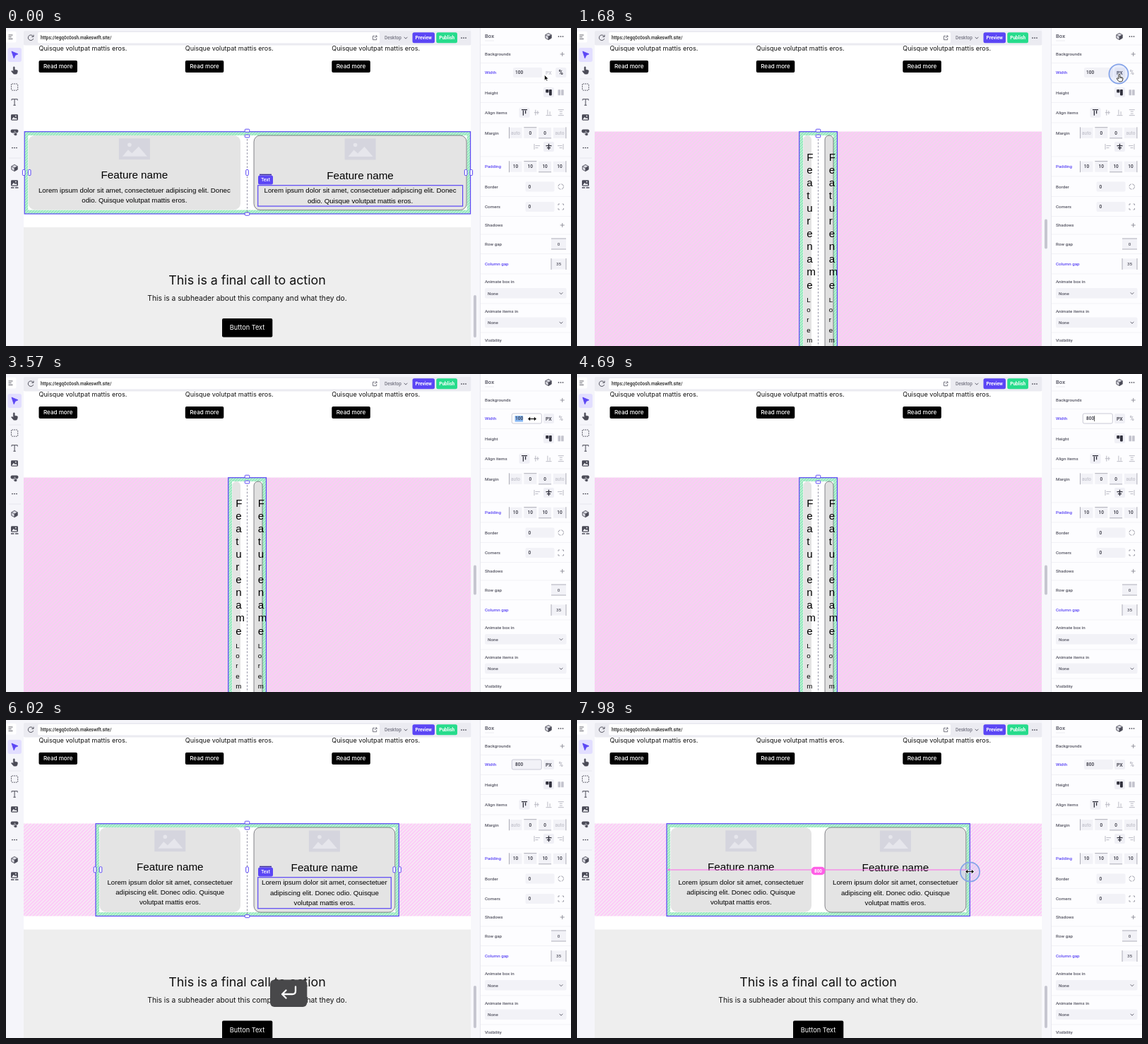
An HTML page that plays this animation: 800x450 px, repeating every 8 s.

```html
<!DOCTYPE html>
<html lang="en">
<head>
<meta charset="utf-8">
<title>Box width editor</title>
<style>
html, body { margin: 0; width: 100%; height: 100%; overflow: hidden; background: #f5f5fa; }
svg { display: block; width: 100vw; height: 100vh; }
text { font-family: Roboto, sans-serif; font-size: 6.25px; font-weight: 500; fill: #555562; white-space: pre; }
.page { font-family: Inter, sans-serif; font-weight: 400; fill: #111; }
.copy { font-family: "Liberation Sans", Arial, sans-serif; font-weight: 400; fill: #000; }
</style>
</head>
<body>
<svg id="stage" viewBox="0 0 800 450" xmlns="http://www.w3.org/2000/svg"></svg>
<script>
const LOOP = 8000;
const VIOLET = '#5b46f5', INK = '#30303c', ICON = '#4b4b57', PALE = '#c3c3cd', FIELD = '#f2f2f7', EDGE = '#9a9aa6';
const stage = document.getElementById('stage');

// Markup helpers
const rect = (x, y, w, h, fill, r = 0, more = '') =>
  `<rect x="${x}" y="${y}" width="${w}" height="${h}" rx="${r}" fill="${fill}" ${more}/>`;
const path = (d, stroke = INK, w = 1, fill = 'none', more = '') =>
  `<path d="${d}" stroke="${stroke}" stroke-width="${w}" fill="${fill}" ${more}/>`;
const text = (x, y, s, more = '') => `<text x="${x}" y="${y}" ${more}>${s}</text>`;
const mid = 'text-anchor="middle" ';
const style = (px, fill, weight) =>
  `style="font-size:${px}px${fill ? ';fill:' + fill : ''}${weight ? ';font-weight:' + weight : ''}"`;
const at = (x, y, s) => `<g transform="translate(${x} ${y})">${s}</g>`;
const group = (id, s) => `<g id="${id}">${s}</g>`;
const dots = (x, y, c = INK) => [-3, 0, 3].map(d => `<circle cx="${x + d}" cy="${y}" r=".85" fill="${c}"/>`).join('');
const plus = (x, y) => path(`M${x - 3} ${y}h6M${x} ${y - 3}v6`, '#7b7b88', .8);
const chevron = (x, y) => path(`M${x - 2.3} ${y - 1.2}l2.3 2.4 2.3-2.4`, '#555562', .9);
const stripes = (id, base, line, gap, w) =>
  `<pattern id="${id}" width="${gap}" height="${gap}" patternUnits="userSpaceOnUse" patternTransform="rotate(45)">
   ${rect(0, 0, gap, gap, base)}${rect(0, 0, w, gap, line)}</pattern>`;

const defs = `<defs>
  ${stripes('green', '#c9f3dc', '#86e6b4', 2.8, 1.4)}
  ${stripes('pink', '#fdc9f8', '#ecdbe9', 3.5, 1.5)}
  ${stripes('pinkSoft', '#fdc9f8', '#f6e9f4', 3.5, 1.7)}
  <clipPath id="view"><rect x="25" y="24" width="633.5" height="426"/></clipPath>
</defs>`;

function cube(x, y) {
  return at(x, y, path('M0-4.6L4.2-2.3V2.3L0 4.6-4.2 2.3V-2.3Z', ICON, .9, '#dcdce4') +
    path('M0 0L4.2-2.3V2.3L0 4.6Z', 'none', 0, ICON) + path('M-4.2-2.3L0 0 4.2-2.3M0 0V4.6', ICON, .8));
}

function picture(x, y) {
  return at(x, y, rect(-5, -4.2, 10, 8.4, ICON, 1.4) +
    path('M-4 3L-1.2-.4 .8 1.6 2.2.4 4 3Z', 'none', 0, '#f5f5fa') + '<circle cx="1.8" cy="-1.8" r=".9" fill="#f5f5fa"/>');
}

const ARROW = 'M-4-5L5-1.2 1.2.6-.8 4.8Z';
const HAND = 'M-1.7 1V-4.2Q-1.7-5.3-.7-5.3T.3-4.2V-1L3.6-.4Q4.6-.1 4.5 1L4 3.6Q3.7 5.3 2 5.3H-.3Q-1.3 5.3-2 4.3L-4.3 1.4Q-4.6.6-3.8.4T-1.7 1.6Z';

function toolbar() {
  return rect(0, 0, 25, 450, '#f5f5fa') + rect(-2, 5, 16.5, 15.5, '#fff', 2) +
    path('M3.5 10h6M3.5 12.7h4.2M3.5 15.4h6', INK, .8) +
    rect(2.5, 28, 19.5, 20, '#e2deff', 3) +
    at(12, 38, path(ARROW, VIOLET, .8, VIOLET)) +
    at(12, 60, path(HAND, ICON, .4, ICON)) +
    path('M4 72h17M4 184h17', '#e4e4ec', .8) +
    rect(7.5, 79, 9.2, 9.2, 'none', 1, `stroke="${ICON}" stroke-width="1" stroke-dasharray="1.7 1.2"`) +
    path('M8 102.5v-1.8h8.2v1.8M12.1 101v8.4M10.4 109.2h3.4', ICON, 1) +
    picture(12, 126.5) +
    rect(6.5, 143.4, 11, 5, ICON, 2.4) + at(13, 149, path(HAND, '#f5f5fa', .8, ICON, 'transform="scale(.6)"')) +
    dots(12, 169.5) + cube(12, 198) + picture(12, 219.5) + path('M7 226h4.5M13 226h4.5', ICON, 1.3);
}

function topBar() {
  return rect(25, 4, 633.5, 20.5, '#ebebf1', 2) + rect(45, 6, 484, 15.5, '#fff', 2) +
    path('M38.4 11.8a3.8 3.8 0 1 0 .3 3.2M39 9.7v2.7h-2.7', ICON, .95) +
    text(49, 16.1, 'https://iegq0c0osh.makeswift.site/', style(6.4, '#222')) +
    path('M522 11.3h-2.5v5.4h5.2v-2.5M522 14l2.8-2.9M523 11h2v2', '#555562', .8) +
    text(536, 16.1, 'Desktop', style(6.5, '#777784')) + chevron(566, 14) +
    rect(575.5, 6.3, 31.5, 15, VIOLET, 2.5) + rect(609.3, 6.3, 29.7, 15, '#27dc8c', 2.5) +
    text(591.2, 16, 'Preview', mid + style(6.5, '#fff', 700)) +
    text(624.2, 16, 'Publish', mid + style(6.5, '#fff', 700)) + dots(648, 14);
}

function fourSides(y, values) {
  return values.map((v, i) => {
    const x = 721.5 + i * 20.8;
    const edge = [`M${x - 9} ${y - 8}v16`, `M${x - 9} ${y - 7.6}h18`, `M${x - 9} ${y + 7.6}h18`, `M${x + 9} ${y - 8}v16`][i];
    return rect(x - 9, y - 7.5, 18, 15, FIELD) + path(edge, EDGE, .8) +
      text(x, y + 2.2, v, mid + style(6.5, v === 'auto' ? PALE : INK));
  }).join('');
}

function alignIcon(x, y, kind, on) {
  const c = on ? INK : '#b4b4be';
  const bars = [
    'M-4-4h8M-1.6-3v7M1.6-3v4.5', 'M-3.5 0h7M-1.5-4v8M1.5-2.6v5.2',
    'M-4 4h8M-1.6 3v-7M1.6 3v-4.5', 'M-4-4h8M-4 4h8M-2-1.5h4M-2 1.5h4',
    'M-4-4v8M-2.5-1.4h6.5M-2.5 1.6h4', 'M0-4.2v8.4M-4-1.4h8M-2.6 1.6h5.2', 'M4-4v8M2.5-1.4h-6.5M2.5 1.6h-4'][kind];
  return (on ? rect(x - 7.5, y - 7, 15, 14, '#f0f0f6', 2) : '') + at(x, y, path(bars, c, on ? 1.3 : .9));
}

function panel() {
  const labels = [['Backgrounds', 37], ['Width', 63, 1], ['Height', 91.5], ['Align items', 120], ['Margin', 148.5],
    ['Padding', 196, 1], ['Border', 224.5], ['Corners', 253], ['Shadows', 279.2], ['Row gap', 305.5],
    ['Column gap', 334, 1], ['Animate box in', 359], ['Animate items in', 400.5], ['Visibility', 442]];
  const lines = [24, 49.5, 77.5, 105.5, 134, 182, 210, 238.5, 266.5, 292, 319.5, 348, 390, 431];
  const select = y => rect(678, y - 7.5, 115.5, 14.5, FIELD, 2) + text(682, y + 2.1, 'None') + chevron(786, y);
  const small = y => rect(735.5, y - 7, 41, 14, FIELD, 2) + text(739.5, y + 2.2, '0', style(6.5, INK));
  return rect(658.5, 0, 13, 450, '#f7f7fb') + rect(671.5, 0, 129, 450, '#fdfdff') + path('M671.5 0V450', '#e1e1e9', .8) +
    lines.map(y => path(`M672 ${y}h128`, '#ececf2', .7)).join('') +
    text(678, 14.4, 'Box', style(7.7)) + path('M678 18h13', '#d4d4de', .5) + cube(768, 12) + dots(785.5, 12) +
    labels.map(([s, y, on]) => text(678, y + 2.1, s, on ? `style="fill:${VIOLET}"` : '')).join('') +
    plus(787.7, 37) + plus(787.7, 279) +
    rect(761, 84, 15, 14, '#f0f0f6', 2) + rect(764.2, 87, 4.2, 4.6, INK, .8) + rect(769, 87, 3.8, 8.4, INK, .8) +
    rect(781.5, 87.3, 3.6, 8, PALE, .6) + rect(786.1, 87.3, 3.6, 8, PALE, .6) +
    [734, 751.3, 768.5, 785.8].map((x, i) => alignIcon(x, 119.7, i, !i)).join('') +
    fourSides(148.3, ['auto', 0, 0, 'auto']) +
    [752, 768.5, 785].map((x, i) => alignIcon(x, 168, i + 4, i === 1)).join('') +
    fourSides(196.2, [10, 10, 10, 10]) + small(224.5) + small(253) +
    '<circle cx="785.7" cy="224.5" r="3.8" fill="none" stroke="#7b7b88" stroke-width=".7" stroke-dasharray="4.6 1.4"/>' +
    path('M782 251v-2h2M787.5 249h2v2M789.5 255v2h-2M784 257h-2v-2', '#8b8b98', .8) +
    rect(772, 298, 21, 15, FIELD) + path('M772 298h21M772 313h21', EDGE, .8) + text(782.5, 307.7, '0', mid) +
    rect(772, 326.5, 21, 15, FIELD) + path('M772 326v16M793 326v16', EDGE, .8) + text(782.5, 336.2, '35', mid) +
    select(375.5) + select(417);
}

function teasers() {
  return [46.5, 253.8, 461.3].map(x => text(x, 31.7, 'Quisque volutpat mattis eros.', 'class="page" ' + style(9.05)) +
    rect(x, 46, 54.5, 17, '#000', 2) +
    text(x + 27.2, 57.4, 'Read more', mid + 'class="page" ' + style(8.1, '#fff', 500))).join('');
}

function footer() {
  return rect(25, 282, 633.5, 190, '#eee') +
    text(341.5, 362.6, 'This is a final call to action', mid + 'class="page" ' + style(17.85)) +
    text(341.5, 385.6, 'This is a subheader about this company and what they do.', mid + 'class="page" ' + style(10.25)) +
    rect(306, 411, 71.3, 26.5, '#000', 2) +
    text(341.6, 427.4, 'Button Text', mid + 'class="page" ' + style(9.2, '#fff'));
}

const handle = (x, y, w, h) => rect(x - w / 2, y - h / 2, w, h, '#fff', 1, `stroke="${VIOLET}" stroke-width="1"`);
const topHandles = handle(341.5, 145.2, 6.5, 4) + handle(341.5, 153, 6.5, 3.8);
const outline = (x0, x1, y1) => rect(x0, 146.7, x1 - x0, y1 - 146.7, 'none', 0, `stroke="${VIOLET}" stroke-width="1.2"`);
const divider = y1 => path(`M341.5 157V${y1}`, '#77778f', .8, 'none', 'stroke-dasharray="2.6 2.2"');
const cardEdge = 'stroke="#55555c" stroke-width=".7"';

function card(x0, x1, y1, lines, dy, more = '') {
  const cx = (x0 + x1) / 2;
  return rect(x0, 152, x1 - x0, y1 - 152, '#e4e4e4', 9, more) +
    at(cx, 171.2 + dy * .5, rect(-22, -15, 44, 30, '#d5d5de') +
      path('M-17 10.5L-9 1-3.5 6 6-3.5 18 10.5Z', 'none', 0, '#e6e6ec') + '<circle cx="-7" cy="-6" r="2.8" fill="#e6e6ec"/>') +
    text(cx, 213 + dy, 'Feature name', mid + 'class="copy" ' + style(15.2)) +
    lines.map((s, i) => text(cx, 232.6 + dy + i * 14.4, s, mid + 'class="copy" ' + style(9.7))).join('');
}

// Two cards side by side; marks are the parts hidden while resizing
function wideBox(id, x0, x1, y1, lines) {
  const cy = (146.7 + y1) / 2 - .3, textEnd = x1 - 11, textBottom = 222.5 + lines.length * 14.6 + .4;
  return group(id, rect(x0, 146.7, x1 - x0, y1 - 146.7, 'url(#green)') +
    rect(x0 + 5, 152, x1 - x0 - 10, y1 - 157.4, '#fff') +
    card(x0 + 5.5, 332, y1 - 5.8, lines, 0) + card(351, x1 - 5.5, y1 - 5.4, lines, .6, cardEdge) +
    outline(x0, x1, y1) +
    `<g class="marks">${divider(y1 - 2)}${topHandles}${handle(341.5, y1 + .2, 6.5, 4)}${handle(341.5, cy, 3.6, 8)}` +
    [x0 - 1, x0 + 7, x1 - 6.5, x1 + 1.2].map(x => handle(x, cy, 3.6, 8)).join('') +
    rect(356.7, 222.7, textEnd - 356.7, textBottom - 222.7, 'none', 0, `stroke="${VIOLET}" stroke-width="1.2"`) +
    path('M359 207.5h17', '#3a2b9c', 1.6) + rect(357, 208.5, 21, 13, VIOLET, 2.5) +
    text(367.5, 217.4, 'Text', mid + style(6.5, '#fff')) + '</g>');
}

function thinBox() {
  const column = x => [...'Featurename'].map((c, i) => text(x, 187.5 + i * 18.1, c, 'class="copy" ' + style(15.2))).join('') +
    [...'Lorem'].map((c, i) => text(x, 387.5 + i * 14.45, c, 'class="copy" ' + style(9.7))).join('');
  return group('thin', rect(25, 146.5, 633.5, 310, 'url(#pink)') + rect(314.7, 146.7, 53.8, 320, 'url(#green)') +
    rect(320, 152, 43, 320, '#fff') + rect(320.3, 152, 11.7, 320, '#e4e4e4', 5.8) +
    rect(351, 152, 12, 320, '#e0e0e0', 6, cardEdge) + column(325.3) + column(356.8) +
    outline(314.7, 368.5, 470) + divider(450) + topHandles);
}

function pointers() {
  return group('ring', '<circle r="13.6" fill="#7d9cea" fill-opacity=".14" stroke="#84a3e8" stroke-width="1.7"/>') +
    group('arrow', path('M0 0V7.4L1.8 5.9 3.1 8.6 4.3 8 3.1 5.5H5.4Z', '#fff', .6, '#000')) +
    group('hand', path(HAND, '#fff', 2.2, '#fff') + path(HAND, '#111', .9, '#fff') + path('M.3-1V1M2 -.6V1M3.5-.2V1', '#111', .6)) +
    group('sizer', path('M-5 0H5M-2.6-2.4L-5.2 0-2.6 2.4M2.6-2.4L5.2 0 2.6 2.4', '#fff', 2.6) +
      path('M-5 0H5', '#111', 1.2) + path('M-6 0L-2.8-2.7V2.7ZM6 0L2.8-2.7V2.7Z', 'none', 0, '#111'));
}

const dragLine = path('M130 212H554', '#ff66ea', 1) + '<circle cx="130" cy="212" r="1.4" fill="#ff66ea"/>' +
  rect(331.8, 207.8, 19.4, 11.4, '#ff5fe6', 5) + text(341.5, 215.8, '800', mid + style(6.3, '#fff', 700));

const enterKey = rect(374, 367.5, 52.3, 38.5, '#48484a', 6) +
  path('M410 377.5V383.5Q410 388 405.5 388H391M396.5 382.5L391 388 396.5 393.5', '#fff', 2.3, 'none', 'stroke-linecap="round" stroke-linejoin="round"');

stage.innerHTML = defs + rect(0, 0, 800, 450, '#f5f5fa') + toolbar() + rect(25, 24, 633.5, 426, '#fff') +
  `<g clip-path="url(#view)">${teasers()}${group('footer', footer())}` +
  group('sides', rect(25, 146.5, 633.5, 131, 'url(#pinkSoft)')) + thinBox() + '</g>' + topBar() + panel() +
  wideBox('full', 26.2, 657.6, 263, ['Lorem ipsum dolor sit amet, consectetuer adipiscing elit. Donec', 'odio. Quisque volutpat mattis eros.']) +
  wideBox('fixed', 127, 556.3, 277.5, ['Lorem ipsum dolor sit amet, consectetuer', 'adipiscing elit. Donec odio. Quisque', 'volutpat mattis eros.']) +
  group('drag', dragLine) +
  '<rect id="thumb" x="662" width="4" rx="2" fill="#c6c6d0"/>' +
  '<rect id="field" y="56" height="14" rx="2"/>' + '<rect id="picked" x="720.6" y="59" width="11.5" height="8.6" fill="#86b7f3"/>' +
  text(721, 65.3, '', 'id="value" ' + style(6.5, INK)) +
  group('caret', path('M732.6 59v8', '#111', .7)) +
  '<rect id="unitBox" y="56" width="15" height="14" rx="2" fill="#f0f0f6"/>' +
  text(768.3, 65.5, 'PX', mid + 'id="px" ' + style(7)) + text(785.7, 66, '%', mid + 'id="pct" ' + style(8.6, INK, 700)) +
  group('enter', enterKey) + pointers();

const ui = {};
stage.querySelectorAll('[id]').forEach(el => ui[el.id] = el);
const marks = ui.fixed.querySelector('.marks');

const show = (el, on) => el.style.display = on ? '' : 'none';
const set = (el, attrs) => { for (const k in attrs) el.setAttribute(k, attrs[k]); };
const ramp = (t, a, b) => Math.min(1, Math.max(0, (t - a) / (b - a)));
const ease = p => p * p * (3 - 2 * p);

// Start, end, destination of each pointer move
const moves = [[150, 800, 768.5, 70.5], [1960, 2240, 745, 63.5], [6700, 7450, 556, 214.5]];
function pointerAt(t) {
  let x = 762.5, y = 66.5;
  for (const [a, b, tx, ty] of moves) {
    const p = ease(ramp(t, a, b));
    x += (tx - x) * p;
    y += (ty - y) * p;
  }
  return [x, y];
}

// Press, release, centre of each click ring
const clicks = [[1440, 1860, 767, 65], [2260, 2400, 745, 63.5], [7700, 9000, 556.5, 215]];

function render(t) {
  const thin = t >= 1610 && t < 5600, fixed = t >= 5600, full = t < 1610;
  const drag = t >= 7800;
  show(ui.full, full);
  show(ui.thin, thin);
  show(ui.fixed, fixed);
  show(ui.sides, fixed);
  show(ui.footer, !thin);
  show(marks, !drag);
  show(ui.drag, drag);
  set(ui.footer, { transform: `translate(0 ${fixed ? 14.5 : 0})` });
  set(ui.thumb, { y: full ? 378 : thin ? 270.5 : 376, height: thin ? 42 : 60 });

  const focus = t >= 2380 && t < 6700, typed = Math.floor(1 + ramp(t, 4130, 4550) * 2);
  const value = t < 4130 ? '100' : '800'.slice(0, typed);
  ui.value.textContent = value;
  set(ui.field, {
    x: focus ? 716.3 : 718, width: focus ? 42 : 41,
    fill: focus && t < 5600 ? '#fff' : FIELD, stroke: focus ? '#c3c3d1' : 'none', 'stroke-width': .9
  });
  show(ui.picked, t >= 2380 && t < 4130);
  show(ui.caret, t >= 4130 && t < 5600);
  set(ui.caret, { transform: `translate(${(value.length - 3) * 3.65} 0)` });
  set(ui.unitBox, { x: full ? 778.3 : 761 });
  ui.px.style.fill = full ? PALE : INK;
  ui.pct.style.fill = full ? INK : '#b4b4be';

  ui.enter.style.opacity = ramp(t, 5470, 5600) * (1 - ramp(t, 6370, 6580));

  const [x, y] = pointerAt(t), hidden = t >= 4130 && t < 6700;
  const kind = t < 700 ? 'arrow' : t < 2160 ? 'hand' : t < 4130 ? 'sizer' : t < 7380 ? 'arrow' : 'sizer';
  for (const k of ['arrow', 'hand', 'sizer']) {
    show(ui[k], !hidden && k === kind);
    set(ui[k], { transform: `translate(${x} ${y})` });
  }
  const click = clicks.find(c => t >= c[0] && t < c[1] + 140);
  show(ui.ring, click);
  if (click) {
    const [a, b, cx, cy] = click, p = ramp(t, a, a + 200);
    set(ui.ring, { transform: `translate(${cx} ${cy}) scale(${.5 + .5 * p})` });
    ui.ring.style.opacity = (.2 + .8 * p) * (1 - ramp(t, b, b + 140));
  }
}

const start = performance.now();
function tick() {
  render((performance.now() - start) % LOOP);
  requestAnimationFrame(tick);
}
tick();
</script>
</body>
</html>
```
